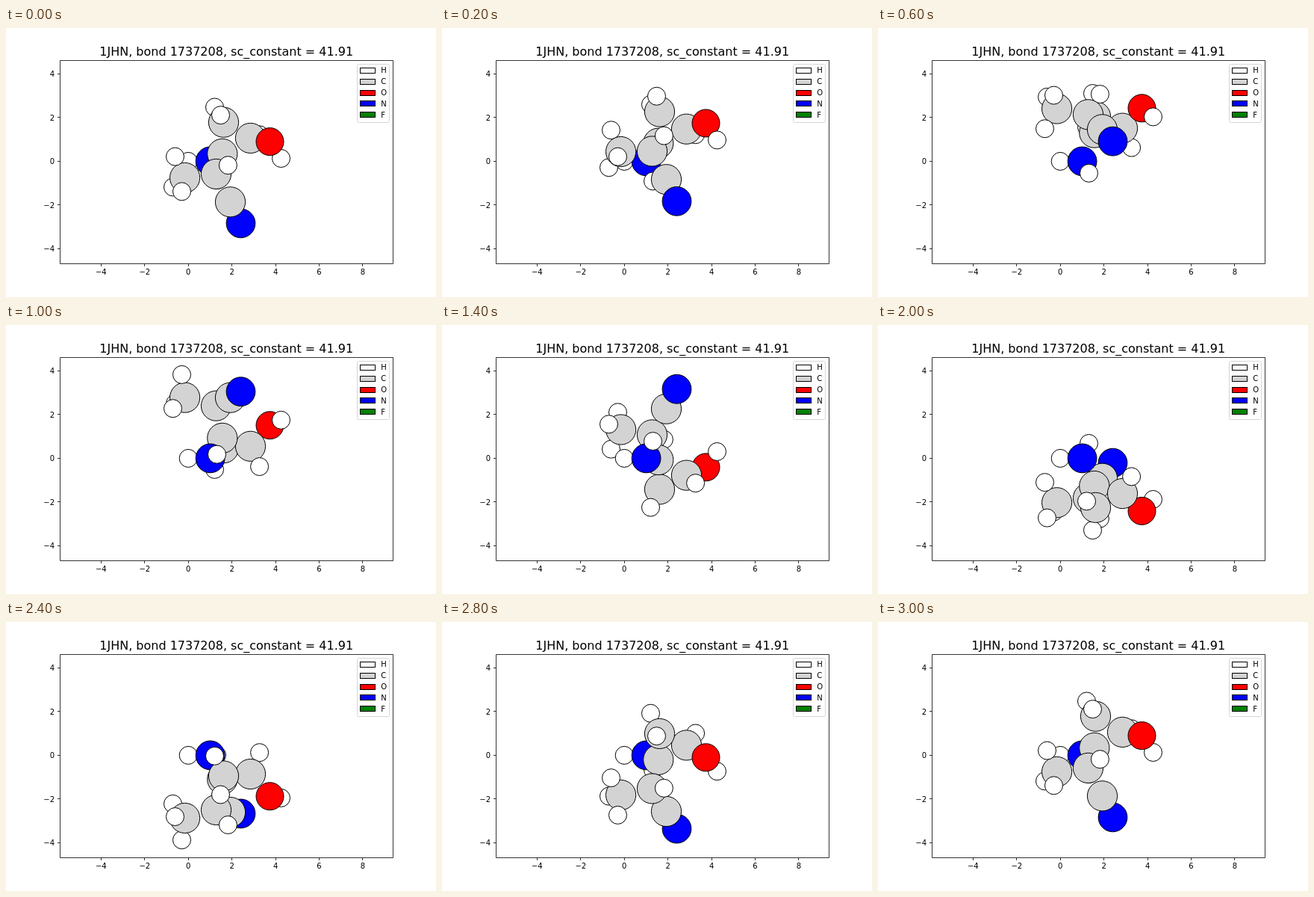
These frames come from a looping animation (576x360 px, 3.2 s). An HTML page:

```html
<!DOCTYPE html>
<html lang="en">
<head>
<meta charset="utf-8">
<title>Rotating molecule</title>
<style>
html, body { margin: 0; width: 100%; height: 100%; overflow: hidden; background: #fff; }
svg { display: block; width: 576px; height: 360px; font: 10px "DejaVu Sans", sans-serif; }
</style>
</head>
<body>
<svg id="stage" viewBox="0 0 576 360"></svg>
<script>
const stage = document.getElementById("stage");
const X0 = 244.2, Y0 = 178.4, UNIT = 29.22;
const STEP_MS = 200, STEPS = 16;
const COLORS = { H: "white", C: "lightgray", O: "red", N: "blue", F: "green" };
const RADII = { H: 12, C: 20.1, O: 18.5, N: 19.4 };

// element, x, height and depth relative to the rotation axis (px)
const ATOMS = [
  ["H", 244.2, 0, 0], ["N", 273.6, 0, 0],
  ["H", 226.5, 6.3, 88.4], ["H", 223.5, -34.5, 57.1], ["H", 235.5, -40.4, 106],
  ["C", 239.6, -22, 81.2], ["C", 281.5, -17, 71.3], ["C", 289.8, 10, 37],
  ["C", 291.5, 52.2, 46], ["C", 300.5, -54.4, 62.4], ["C", 327.5, 31, 36.5],
  ["N", 314.5, -83, 55.1], ["O", 353.5, 26.3, 66.2], ["H", 368.5, 3.9, 61.3],
  ["H", 339.6, 35.6, 7.7], ["H", 279.5, 72.4, 24.5], ["H", 287.5, 61.8, 75.4],
  ["H", 297.4, -5.3, 96.2], ["H", 282.5, -25.2, -8.5]
];

function add(tag, attrs, parent = stage) {
  const el = document.createElementNS("http://www.w3.org/2000/svg", tag);
  for (const name in attrs) el.setAttribute(name, attrs[name]);
  return parent.appendChild(el);
}

function label(text, x, y, anchor = "start", size = 10) {
  add("text", { x, y, "text-anchor": anchor, "font-size": size }).textContent = text;
}

const line = d => add("path", { d, fill: "none", stroke: "black", "stroke-width": 0.8 });
const snap = v => Math.floor(v) + 0.5;
const signed = v => String(v).replace("-", "\u2212");

const molecule = add("g", { stroke: "black" });
const atoms = ATOMS.map(([kind, x, a, b]) => ({
  a, b, el: add("circle", { cx: x, r: RADII[kind], fill: COLORS[kind] }, molecule)
}));

// Axes
line("M72.5 43.5H518.5V315.5H72.5Z");
for (let v = -4; v <= 8; v += 2) {
  const x = X0 + v * UNIT;
  line(`M${snap(x)} 315.5v3.5`);
  label(signed(v), x, 329.7, "middle");
}
for (let v = -4; v <= 4; v += 2) {
  const y = Y0 - v * UNIT;
  line(`M72.5 ${snap(y)}h-3.5`);
  label(signed(v), 65, y + 3.7, "end");
}
label("1JHN, bond 1737208, sc_constant = 41.91", 295.2, 37.2, "middle", 16);

// Legend
add("rect", { x: 470.5, y: 48.5, width: 43, height: 78, rx: 2, fill: "white",
  stroke: "#ccc", opacity: 0.8 });
Object.keys(COLORS).forEach((kind, i) => {
  const y = 56.9 + i * 14.8;
  add("rect", { x: 474.5, y: snap(y - 3.4), width: 20, height: 7,
    fill: COLORS[kind], stroke: "black" });
  label(kind, 502.2, y + 3.5);
});

let shown = -1;
function draw(now) {
  const step = Math.floor(now / STEP_MS) % STEPS;
  if (step !== shown) {
    shown = step;
    // The last step completes the turn and repeats the first pose.
    const angle = 2 * Math.PI * step / (STEPS - 1);
    const c = Math.cos(angle), s = Math.sin(angle);
    for (const atom of atoms) {
      atom.depth = atom.b * c - atom.a * s;
      atom.el.setAttribute("cy", Y0 - atom.a * c - atom.b * s);
    }
    const order = [...atoms].sort((p, q) => p.depth - q.depth);
    molecule.append(...order.map(atom => atom.el));
  }
  requestAnimationFrame(draw);
}
draw(performance.now());
</script>
</body>
</html>
```
